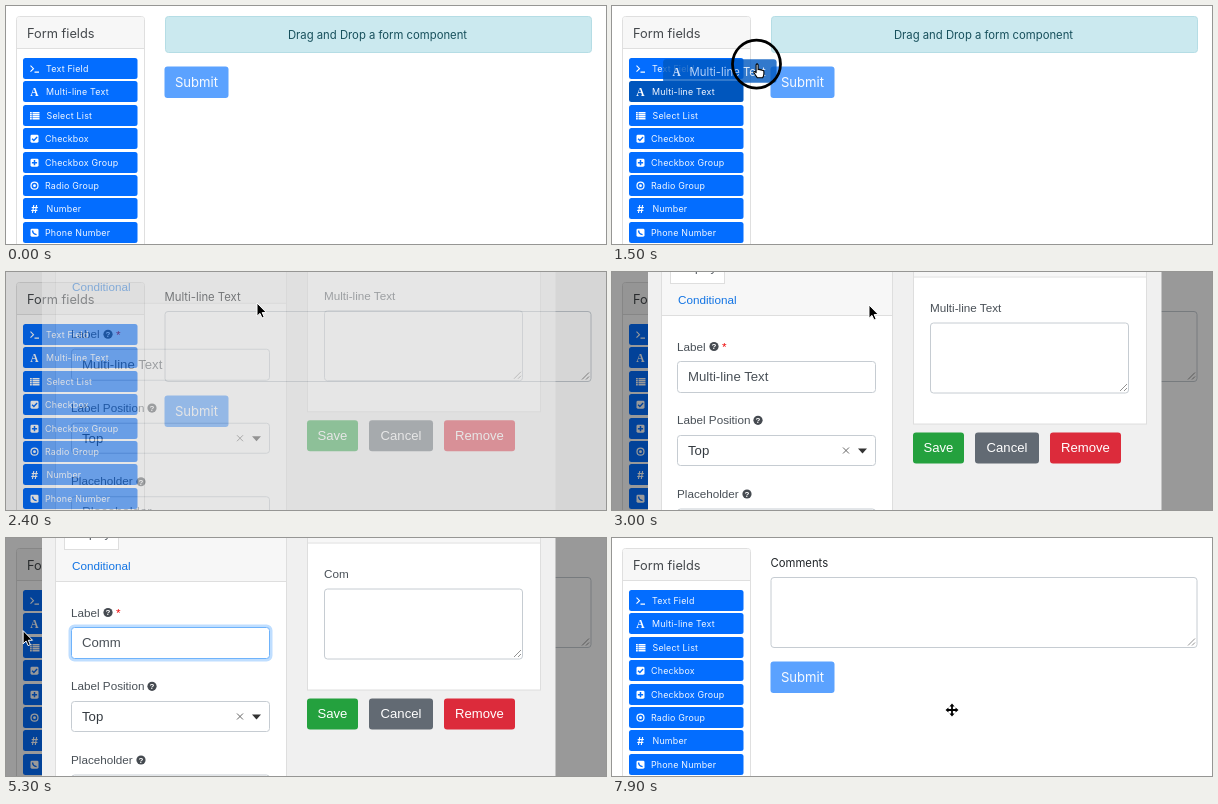
These frames come from a looping animation (600x238 px, 8 s). An HTML page:

```html
<!DOCTYPE html>
<html lang="en">
<head>
<meta charset="utf-8">
<title>Form builder</title>
<style>
  html, body { margin: 0; width: 100%; height: 100%; overflow: hidden; background: #fff; }
  svg { display: block; width: 600px; height: 238px; }
  text { font-family: Inter, sans-serif; white-space: pre; }
  .dialog-text { font-family: "Liberation Sans", Arial, sans-serif; }
  .serif { font-family: "Liberation Serif", serif; font-weight: 700; }
  .tool { letter-spacing: .2px; }
  .bold { font-weight: 600; }
  #popup { filter: drop-shadow(0 1px 2px rgba(0, 0, 0, .25)); }
</style>
</head>
<body>
<svg id="stage" viewBox="0 0 600 238"></svg>
<script>
const LOOP = 8000;
const BLUE = '#036dff', DARK_BLUE = '#0056bd', LINK = '#1274e4', INK = '#212529', GREY = '#495057';
const OLD_LABEL = 'Multi-line Text', NEW_LABEL = 'Comments';

const rect = (x, y, x2, y2, fill, more = '') =>
  `<rect x="${x}" y="${y}" width="${x2 - x}" height="${y2 - y}" fill="${fill}" ${more}/>`;
const text = (x, y, size, fill, str, more = '') =>
  `<text x="${x}" y="${y}" font-size="${size}" fill="${fill}" ${more}>${str}</text>`;
const path = (d, more) => `<path d="${d}" ${more}/>`;
const label = (x, y, size, fill, str, more = '') =>
  text(x, y, size, fill, str, `class="dialog-text" ${more}`);
const field = (x, y, x2, y2, stroke = '#c6ccd2', more = '') =>
  rect(x + .5, y + .5, x2 - .5, y2 - .5, '#fff', `rx="3" stroke="${stroke}" ${more}`);
const grip = (x, y) => path(`M${x - 7} ${y}l7 -7M${x - 3} ${y}l3 -3`, 'stroke="#777" stroke-width=".8"');
const help = (x, y) => `<circle cx="${x}" cy="${y}" r="4.6" fill="#454a50"/>` +
  label(x, y + 2.8, 8, '#fff', '?', 'text-anchor="middle" font-weight="700"');
const button = (x, x2, fill, str) => rect(x, 160.5, x2, 191.5, fill, 'rx="3"') +
  label((x + x2) / 2, 180.3, 13.1, '#fff', str, 'text-anchor="middle"');

// Icons are drawn around their own centre.
const box = rect(-4, -4, 4, 4, '#fff', 'rx="1.4"');
const blueLine = (d, width = 1.4) => path(d, `fill="none" stroke="${BLUE}" stroke-width="${width}"`);
const letterA = text(0, 3.8, 11.5, '#fff', 'A', 'class="serif" text-anchor="middle"');
const tools = [
  ['Text Field', path('M-4 -3l3 3l-3 3M0 3.4h4.5', 'fill="none" stroke="#fff" stroke-width="1.1"'), 40],
  [OLD_LABEL, letterA, 40],
  ['Select List', path('M-4.5 -3h1.8M-4.5 -1h1.8M-4.5 1h1.8M-4.5 3h1.8M-2 -3h7M-2 -1h7M-2 1h7M-2 3h7',
    'stroke="#fff" stroke-width="1.4"'), 40.5],
  ['Checkbox', box + blueLine('M-2.4 0l1.8 1.8l3.2 -3.4'), 39],
  ['Checkbox Group', box + blueLine('M-2.6 0h5.2M0 -2.6v5.2', 1.5), 39],
  ['Radio Group', '<circle r="3.5" fill="none" stroke="#fff" stroke-width="1.2"/><circle r="1.4" fill="#fff"/>', 39],
  ['Number', text(0, 4, 11, '#fff', '#', 'class="bold" text-anchor="middle"'), 40.5],
  ['Phone Number', box + blueLine('M-1.9 -2.2q.2 3.7 4 4.1'), 39]
];
const toolTop = i => Math.round(52 + 23.4 * i);

const sidebar =
  field(10, 10, 139, 260, '#dfdfdf') +
  path('M11 42V13q0 -2 2 -2H136q2 0 2 2V42z', 'fill="#f7f7f7"') +
  path('M10.5 42.5H138.5', 'stroke="#dfdfdf"') +
  text(21, 31.5, 12.8, '#44484c', 'Form fields') +
  tools.map(([name, icon, x], i) => {
    const y = toolTop(i);
    return rect(17, y, 131.5, y + 21, BLUE, `rx="2.5" id="tool${i}"`) +
      `<g transform="translate(28.5 ${y + 10.7})">${icon}</g>` +
      text(x, y + 14.1, 8.9, '#f2f7ff', name, 'class="tool"');
  }).join('');

const form =
  `<g id="dropZone">` +
    rect(159.5, 10.5, 585.5, 46.5, '#cbe9ef', 'rx="3" stroke="#b5dde5"') +
    text(371.5, 33, 11.3, '#17505c', 'Drag and Drop a form component', 'text-anchor="middle"') +
  `</g><g id="component">` +
    text(158.5, 29, 11.3, INK, OLD_LABEL, 'id="pageLabel"') +
    field(158.5, 39, 585.5, 110) + grip(583, 107.5) +
  `</g><g id="submit">` +
    rect(158.5, 60.5, 222.5, 92, '#5ba2ff', 'rx="3"') +
    text(190.5, 81, 13.1, '#f7faff', 'Submit', 'text-anchor="middle"') +
  `</g>`;

const ghost = `<g id="ghost" opacity=".8">` +
  rect(0, 0, 113.5, 23.5, '#0058c0', 'rx="3"') +
  `<g transform="translate(13.5 13)">${letterA}</g>` +
  text(26.5, 17.2, 11.3, '#dbe8f8', OLD_LABEL) + `</g>`;

const settings =
  rect(49.5, -60, 280.5, 300, '#fff', 'stroke="#dedede"') +
  rect(50, -60, 280, 43, '#f7f7f7') +
  path('M50 43.5H280', 'stroke="#dedede"') +
  rect(58.5, -20, 112.5, 11.5, '#fff', 'stroke="#dedede"') +
  label(66, 0, 11.7, GREY, 'Display') +
  label(129, 0, 11.7, LINK, 'Data') + label(170, 0, 11.7, LINK, 'Validation') +
  label(66, 31.5, 11.7, LINK, 'Conditional') +
  label(65, 78.5, 11.7, GREY, 'Label') + help(102, 74.5) + label(110, 79, 11.7, '#e00', '*') +
  rect(64, 88, 265, 122, 'none', 'id="glow" rx="4.5" stroke="#bfdeff" stroke-width="3"') +
  field(65, 89, 264, 121, '#c6ccd2', 'id="input"') +
  rect(76, 97, 157.5, 112.5, '#d2d2d2', 'id="selection"') +
  label(76, 109, 13.2, GREY, OLD_LABEL, 'id="inputText"') +
  label(65, 152, 11.7, GREY, 'Label Position') + help(146, 148.3) +
  field(65, 163, 264, 194) +
  label(76, 183, 13.2, '#343a40', 'Top') +
  path('M231 175.5l6 6M237 175.5l-6 6', 'stroke="#666" stroke-width="1"') +
  path('M246 176.5h9l-4.5 5z', 'fill="#333"') +
  label(65, 225.5, 11.7, GREY, 'Placeholder') + help(135, 222) +
  field(65, 236.5, 264, 268) +
  label(76, 256, 13.2, '#6c757d', 'Placeholder') +
  `<g id="popup">` + rect(64, 125, 264, 165, '#fff', 'rx="2"') +
  text(74.5, 148, 10.6, '#111', 'Multi-line Text Validation', 'class="bold"') + `</g>`;

const preview =
  rect(301.5, -60, 534.5, 152, '#fff', 'stroke="#dedede"') +
  rect(302, -60, 534, 4.5, '#f7f7f7') +
  path('M302 5H534', 'stroke="#dedede"') +
  label(318, 39.8, 11.7, GREY, OLD_LABEL, 'id="previewLabel"') +
  field(318, 50.5, 517, 121.5) + grip(515, 119) +
  button(301, 352, '#24a13e', 'Save') +
  button(363, 427, '#626a73', 'Cancel') +
  button(438, 509, '#dc2b3b', 'Remove');

const dialog = `<g id="dialog">` +
  rect(36, -60, 549.5, 300, '#f0f0f0') + settings + preview + `</g>`;

const outline = 'fill="#000" stroke="#fff" stroke-width="1" stroke-linejoin="round"';
const pointers = `<g id="pointer">` +
  path('M0 0V13.2L3 10.4L5 15L7.2 14L5.2 9.6H9.4z', `id="arrow" ${outline}`) +
  path('M-1 1q1 -1.6 2 0V6q1.2 -1 2 .3q1.2 -.8 2 .4q1.6 -.4 1.8 1.2V10q0 2 -1.2 4H.2q-1.6 -2.4 -3.4 -5q-.2 -1.6 1.2 -1L-1 9z',
    'id="hand" fill="#fff" stroke="#000" stroke-width="1.1" stroke-linejoin="round"') +
  path('M-2.5 -6.5q2.5 0 2.5 1.5q0 -1.5 2.5 -1.5M0 -5V5M-2.5 6.5q2.5 0 2.5 -1.5q0 1.5 2.5 1.5M-1.5 1.5h3',
    'id="beam" fill="none" stroke="#000" stroke-width="1.1"') +
  path('M0 -6.5l2.6 3H.9V-.9H3.5V-2.6l3 2.6l-3 2.6V.9H.9V3.5H2.6L0 6.5l-2.6 -3H-.9V.9H-3.5V2.6l-3 -2.6l3 -2.6V-.9H-.9V-3.5H-2.6z',
    'id="move" fill="#000"') +
  `<circle id="ring" cx="-.6" cy=".4" fill="none" stroke="#000" stroke-width="2.8"/></g>`;

document.getElementById('stage').innerHTML = rect(0, 0, 600, 238, '#fff') +
  sidebar + form + ghost + rect(0, 0, 600, 238, '#000', 'id="shade"') + dialog + pointers;

const $ = id => document.getElementById(id);
const set = (id, name, value) => $(id).setAttribute(name, value);
const show = (id, on) => set(id, 'visibility', on ? 'inherit' : 'hidden');
const write = (id, str) => { if ($(id).textContent !== str) $(id).textContent = str; };
const progress = (t, from, to) => Math.min(1, Math.max(0, (t - from) / (to - from)));
const smooth = p => p * p * (3 - 2 * p);

// Time, x, y and the bend of the way there.
const route = [
  [100, 52, 250, 1], [900, 111, 79, 1], [1312, 111, 79, 1], [1900, 251, 31, .575],
  [2400, 251, 31, 1], [3000, 257, 33, 1], [3700, 106, 98, 1], [4600, 106, 98, 1],
  [5200, 16, 92, 1], [5600, 23, 96, 1], [6700, 23, 96, 1], [7200, 340, 172, 1], [LOOP, 340, 172, 1]
];
const presses = [[1100, 1900], [3700, 4000], [7150, 7300]];
const DROP = 1950, OPEN = 2200, TYPE = 4700, KEY = 170, CLOSE = 7350;

function pointerAt(t) {
  const i = Math.max(1, route.findIndex(k => k[0] > t));
  const [t0, x0, y0] = route[i - 1], [t1, x1, y1, bend] = route[i];
  const e = smooth(progress(t, t0, t1));
  return [x0 + (x1 - x0) * e, y0 + (y1 - y0) * e ** bend];
}

function pointerKind(t, x, y, dragging) {
  if (t > CLOSE + 200) return 'move';
  if (dragging) return 'hand';
  if (t < DROP) return x > 17 && x < 131 && y > 52 ? 'hand' : 'arrow';
  if (t < OPEN) return 'arrow';
  if (x > 65 && x < 264 && y > 89 && y < 121) return 'beam';
  return x > 301 && x < 352 && y > 160 ? 'hand' : 'arrow';
}

function draw(t) {
  const [x, y] = pointerAt(t);
  const dragging = t >= 1312 && t < DROP;
  const dropped = t >= DROP;

  tools.forEach((_, i) => {
    const over = t < 1312 && t >= 100 && x > 17 && x < 131 && y > toolTop(i) && y < toolTop(i) + 21;
    set('tool' + i, 'fill', over || dragging && i === 1 ? DARK_BLUE : BLUE);
  });
  show('dropZone', !dropped);
  show('component', dropped);
  set('submit', 'transform', `translate(0 ${dropped ? 63 : 0})`);
  write('pageLabel', t < CLOSE ? OLD_LABEL : NEW_LABEL);
  show('ghost', dragging);
  set('ghost', 'transform', `translate(${x - 94} ${y - 4.5})`);

  const opening = progress(t, OPEN, OPEN + 500), closing = progress(t, CLOSE, CLOSE + 450);
  set('shade', 'opacity', .4 * opening * (1 - closing));
  set('dialog', 'opacity', opening * (1 - closing));
  set('dialog', 'transform', `translate(0 ${-40 * ((1 - opening) ** 2.3 + smooth(closing))})`);
  show('dialog', opening > 0 && closing < 1);

  const focus = t >= 3750 && t < 7250;
  show('glow', focus);
  set('input', 'stroke', focus ? '#6fb3fb' : '#c6ccd2');
  show('selection', t >= 3950 && t < TYPE);
  show('popup', t >= 3850 && t < TYPE);
  const typed = Math.floor((t - TYPE) / KEY) + 1;
  const echoed = t >= 6300 ? 8 : Math.min(7, Math.floor((t - TYPE - 200) / KEY) + 1);
  write('inputText', typed < 1 ? OLD_LABEL : NEW_LABEL.slice(0, typed));
  write('previewLabel', echoed < 1 ? OLD_LABEL : NEW_LABEL.slice(0, echoed));

  show('pointer', t >= 100);
  set('pointer', 'transform', `translate(${x} ${y})`);
  const kind = pointerKind(t, x, y, dragging);
  for (const id of ['arrow', 'hand', 'beam', 'move']) show(id, id === kind);
  const radius = Math.max(...presses.map(([down, up]) =>
    24 * progress(t, down, down + 150) * (1 - progress(t, up, up + 210))));
  set('ring', 'r', radius);
  show('ring', radius > 0);
}

const start = performance.now();
function tick() {
  draw((performance.now() - start) % LOOP);
  requestAnimationFrame(tick);
}
draw(0);
requestAnimationFrame(tick);
</script>
</body>
</html>
```
